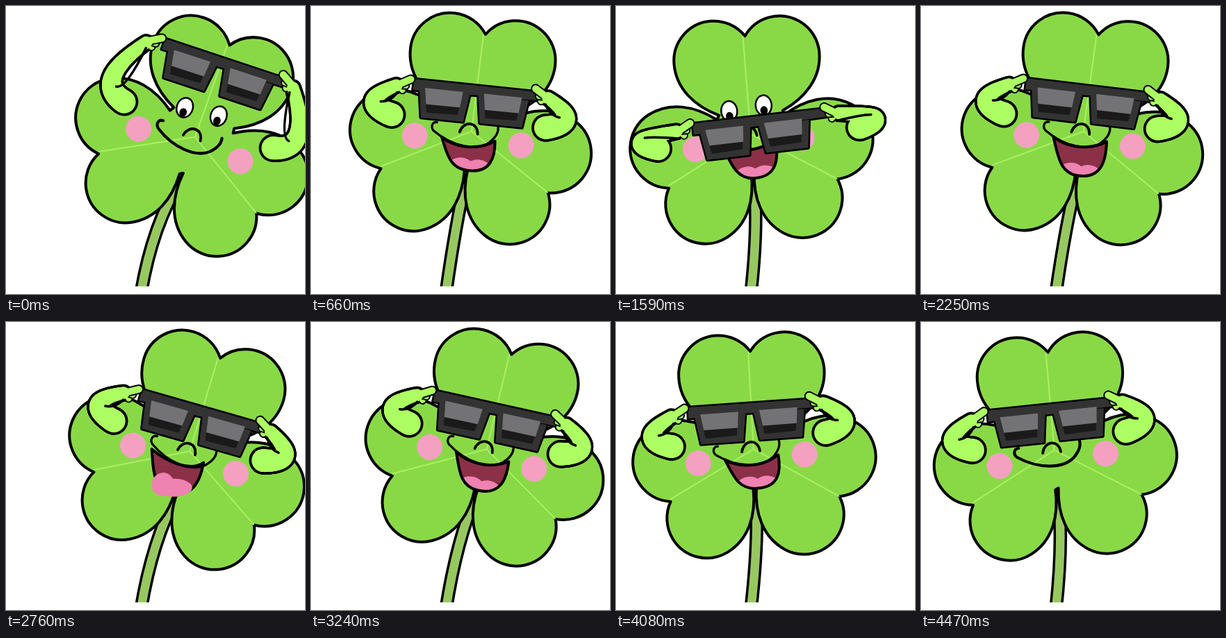
An HTML page with a canvas for the animation above (4500 ms loop, 430 by 415 pixels).

```html
<!DOCTYPE html>
<html>
<head>
<meta charset="utf-8">
<style>
  html, body { margin: 0; overflow: hidden; background: #fff; }
  canvas { display: block; }
</style>
</head>
<body>
<canvas id="stage" width="430" height="415"></canvas>
<script>
const ctx = document.getElementById('stage').getContext('2d');
const LOOP = 4500, STEP = 30, SWAY = 2910, RAD = Math.PI / 180;
const LEAF = '#89d947', SKIN = '#acfe62', PINK = '#ee82b1';

// How the glasses shift and tilt, where the shoulder sits, and the mirror axis of the other arm
const POSES = {
  up: { dx: 4, dy: -54.5, tilt: 0, sx: -113, sy: -14, mirror: -2 },
  on: { dx: 0, dy: 0, tilt: 0, sx: -117, sy: -10, mirror: -12 },
  down: { dx: 10.5, dy: 42, tilt: -1.2, sx: -134, sy: 11, mirror: 23 }
};

const NOSE = new Path2D('M-17 3C-14-14 7-16 9 3');
const SMILE = new Path2D('M-51-7C-58-7-60 1-54 6C-25 25 10 28 27 13C34 6 39-3 37-11');

const lerp = (a, b, k) => a + (b - a) * k;
const ramp = (t, from, to) => Math.min(1, Math.max(0, (t - from) / (to - from)));
const smooth = k => k * k * (3 - 2 * k);

function paint(path, fill, stroke, width = 4) {
  if (fill) { ctx.fillStyle = fill; ctx.fill(path); }
  if (stroke) { ctx.strokeStyle = stroke; ctx.lineWidth = width; ctx.stroke(path); }
}

function ellipse(x, y, rx, ry, fill, stroke, tilt = 0) {
  const p = new Path2D();
  p.ellipse(x, y, rx, ry, tilt, 0, 7);
  paint(p, fill, stroke, 2.5);
}

function poseAt(t) {
  const k = smooth(ramp(t, 150, 480)) - 1 + smooth(ramp(t, 1180, 1380)) - smooth(ramp(t, 1870, 2060));
  const end = k < 0 ? POSES.up : POSES.down, pose = {};
  for (const key in end) pose[key] = lerp(POSES.on[key], end[key], Math.abs(k));
  return pose;
}

function swayAt(t) {
  const p = t / SWAY % 1, turn = 0.485;
  const k = p < turn ? 1 - p / turn : (p - turn) / (1 - turn);
  return 184 + 88 * lerp(k, smooth(k), 0.15);
}

function drawStem(x, y, angle) {
  const stem = new Path2D();
  stem.moveTo(194, 414);
  stem.quadraticCurveTo(205 + (x - 192) * 0.075, 314,
    x - 60 * Math.sin(angle), y + 60 * Math.cos(angle) + 4);
  paint(stem, null, '#000', 19.5);
  paint(stem, null, '#97c860', 12.5);
  ctx.clearRect(0, 404, 430, 11);
}

// One heart turned three ways; each is slightly off its vein
function drawClover() {
  const leaves = [[0, 3], [122, 0], [-118, -3]];
  const cx = 47.5, cy = -109, r = 57.3, notch = Math.atan2(32, cx);
  ctx.beginPath();
  for (const [turn, offset] of leaves) {
    ctx.save();
    ctx.rotate(turn * RAD);
    ctx.translate(offset, 0);
    ctx.lineTo(-46, -30);
    ctx.bezierCurveTo(-80, -46, -cx - r, -73, -cx - r, cy);
    ctx.arc(-cx, cy, r, Math.PI, -notch);
    ctx.arc(cx, cy, r, Math.PI + notch, 0);
    ctx.bezierCurveTo(cx + r, -73, 80, -46, 46, -30);
    ctx.restore();
  }
  ctx.closePath();
  ctx.fillStyle = LEAF;
  ctx.fill();
  ctx.strokeStyle = '#000';
  ctx.lineWidth = 4;
  ctx.stroke();

  const veins = new Path2D();
  for (const [turn] of leaves) {
    veins.moveTo(0, 0);
    veins.lineTo(140 * Math.sin(turn * RAD), -140 * Math.cos(turn * RAD));
  }
  paint(veins, null, '#a9f063', 2);
}

function drawMouth(open, tongue) {
  if (open > 0) {
    const d = lerp(18, 62, open), s = 4 - 11 * tongue;
    const mouth = new Path2D(`M${s - 46} 13C-25 25 10 28 ${s + 31} 10
      C${s + 34} ${d * .6} ${s + 30} ${d} ${s - 3} ${d}
      C${s - 30} ${d} ${s - 36} ${d * .6} ${s - 46} 13Z`);
    ctx.save();
    ctx.clip(mouth);
    paint(mouth, '#8c3047');
    for (const x of [-13, 12]) ellipse(s + x, d + 1, 21, 18.5, PINK);
    ctx.restore();
    paint(mouth, null, '#000');
    if (tongue > 0) {
      ellipse(-23, lerp(48, 57, tongue), 16, 17 * tongue, PINK);
      ellipse(-7, lerp(48, 57, tongue), 27, 13 * tongue, PINK, null, -0.3);
    }
  }
  paint(SMILE, null, '#000', open > 0 ? 3.2 : 4.2);
}

function drawGlasses({ dx, dy, tilt }) {
  const lenses = [[-82, -50], [3, -52]];
  const frame = new Path2D('M-91-65L101-68L102-56L-91-49Z');
  const glass = new Path2D(), shine = new Path2D();
  for (const [x, y] of lenses) {
    const m = new DOMMatrix([1, 0, 0, 1, x, y]);
    frame.addPath(new Path2D('M0-2L73-2L68 38L7 39Z'), m);
    glass.addPath(new Path2D('M8-4L63-5L59 29L14 31Z'), m);
    shine.addPath(new Path2D('M8-4L63-5L61 18L12 19Z'), m);
  }
  ctx.save();
  ctx.translate(dx, dy);
  ctx.rotate(tilt * RAD);
  paint(frame, null, '#000', 5);
  paint(frame, '#333');
  paint(glass, '#1a1a1a');
  paint(shine, '#737275');
  ctx.restore();
}

// A tapering noodle from shoulder to wrist
function drawLimb(sx, sy, wx, wy, grow, color) {
  ctx.fillStyle = color;
  for (let k = 0; k <= 1; k += 0.02) {
    const a = (1 - k) ** 2, b = 2 * k * (1 - k), c = k * k;
    ctx.beginPath();
    ctx.arc(a * sx + b * (sx - 57) + c * wx, a * sy + b * (sy - 13) + c * wy,
      lerp(18.5, 10.5, k) + grow, 0, 7);
    ctx.fill();
  }
}

function drawArm({ dx, dy, sx, sy, mirror }, mirrored) {
  const tx = dx - 91, ty = dy - 62, wx = tx - 22, wy = ty + 8;
  ctx.save();
  if (mirrored) {
    ctx.translate(mirror, -8);
    ctx.scale(-1, 1);
  }
  drawLimb(sx, sy, wx, wy, 1.9, '#000');
  for (const [x, y, width] of [[-15, 15, 8], [-11, 8, 8], [-5, -2, 10]]) {
    const finger = new Path2D();
    finger.moveTo(wx, wy);
    finger.lineTo(tx + x, ty + y);
    paint(finger, null, '#000', width + 4);
    paint(finger, null, SKIN, width);
  }
  drawLimb(sx, sy, wx, wy, -1.9, SKIN);
  const fold = new Path2D();
  fold.moveTo(wx, wy + 11);
  fold.quadraticCurveTo(sx - 4, sy - 18, sx - 18, sy - 17);
  paint(fold, null, '#000', 3.5);
  ctx.restore();
}

function draw(t) {
  const x = swayAt(t);
  const y = 180.5 + 0.0037 * (x - 225) ** 2;
  const angle = (x - 208.2) * 0.3025 * RAD;
  const pose = poseAt(t);
  const open = (ramp(t, 250, 480) - ramp(t, 4080, 4300))
    * (0.88 + 0.17 * (ramp(t, 1000, 1590) - ramp(t, 2800, 3700)));
  const tongue = ramp(t, 2560, 2680) - ramp(t, 2840, 2960);

  ctx.clearRect(0, 0, 430, 415);
  ctx.lineJoin = 'round';
  ctx.lineCap = 'round';
  drawStem(x, y, angle);
  ctx.save();
  ctx.translate(x, y);
  ctx.rotate(angle);
  drawClover();
  ellipse(-80.5, 16, 18.5, 18.5, '#f4a1c1');
  ellipse(73, 11.5, 18.5, 18.5, '#f4a1c1');
  for (const [ex, ey] of [[-28, -35], [22, -39.5]]) {
    ellipse(ex, ey, 11.5, 14.5, '#fff', '#000');
    ellipse(ex, ey + 7.5, 5.3, 6.3, '#000');
  }
  drawMouth(open, tongue);
  paint(NOSE, null, '#000', 3.8);
  drawGlasses(pose);
  drawArm(pose, false);
  drawArm(pose, true);
  ctx.restore();
}

const start = performance.now();
function tick() {
  const t = (performance.now() - start) % LOOP;
  draw(Math.floor(t / STEP) * STEP);
  requestAnimationFrame(tick);
}
tick();
</script>
</body>
</html>
```
